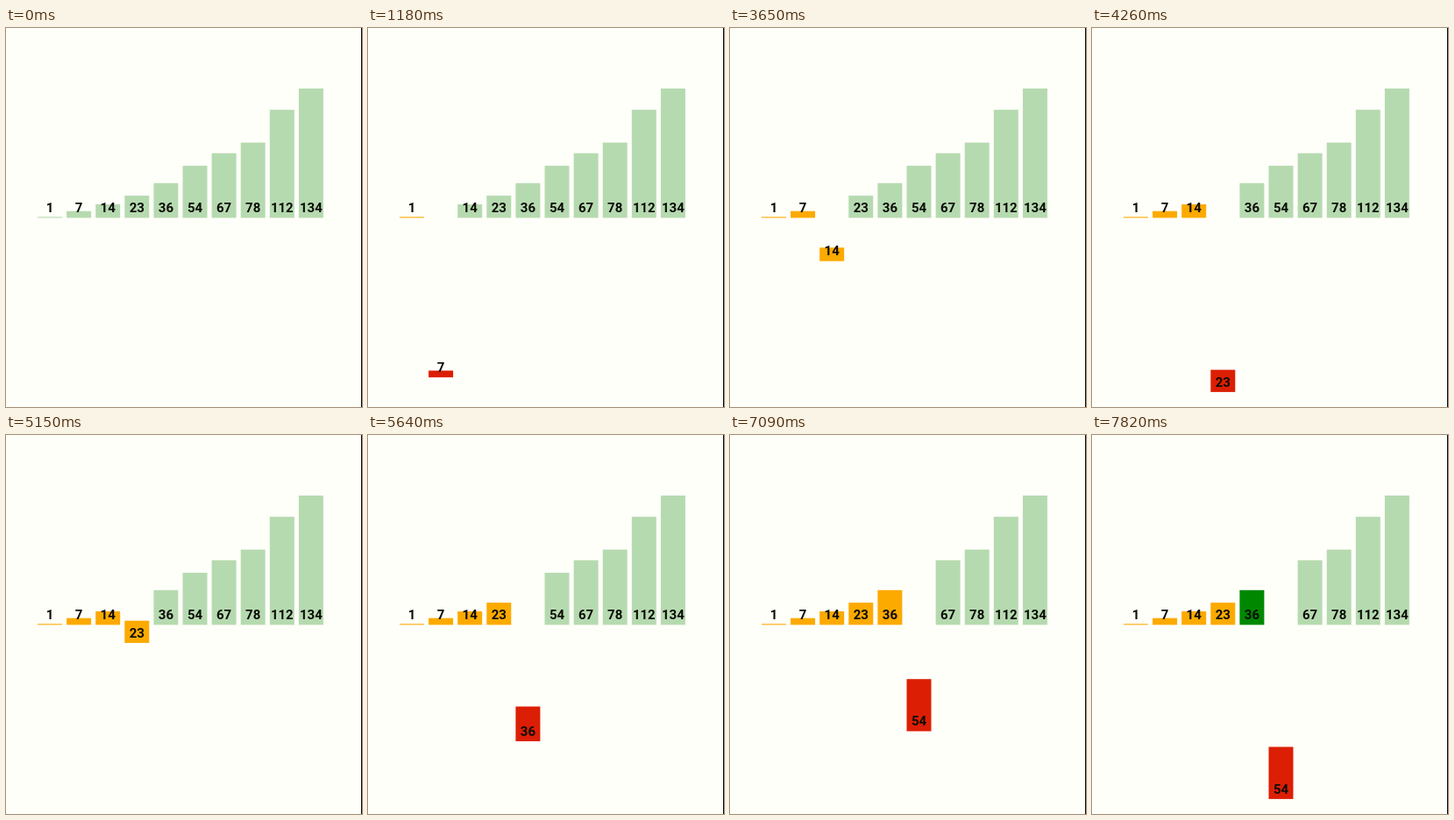
Animation, 406 px wide and 432 px high, one loop 8 s. Source, as an HTML page:

```html
<!DOCTYPE html>
<html lang="en">
<head>
<meta charset="utf-8">
<title>Insertion sort</title>
<style>
  html, body { margin: 0; width: 100%; height: 100%; overflow: hidden; background: #fffffa; }
  svg { display: block; width: 406px; height: 432px; }
  text { font: bold 15px Roboto, Arial, sans-serif; text-anchor: middle; fill: #0c0c08; }
</style>
</head>
<body>
<svg id="stage" viewBox="0 0 406 432">
  <rect x="405" width="1" height="432" fill="#000"/>
</svg>
<script>
  const LOOP = 8000, MOVE = 250, DROP = 198.5;
  const BASE = 216.4, LEFT = 36, PITCH = 33.1, WIDTH = 28, SCALE = 1.1;
  const IDLE = '#b6dab0', SORTED = '#fcaa00', PICKED = '#dc1f04', COMPARED = '#008700';
  const values = [1, 7, 14, 23, 36, 54, 67, 78, 112, 134];
  const FIRST_SORTED = 530;

  // One entry per inserted bar, starting with the second bar
  const passes = [
    { fall: 1000, compare: 1500, rise: 2010 },
    { fall: 2500, compare: 3000, rise: 3500 },
    { fall: 4000, compare: 4500, rise: 4975 },
    { fall: 5500, compare: 6000, rise: 6492 },
    { fall: 6956, compare: 7500, rise: Infinity }
  ];

  const stage = document.getElementById('stage');

  function add(parent, name, attrs) {
    const node = document.createElementNS('http://www.w3.org/2000/svg', name);
    for (const key in attrs) node.setAttribute(key, attrs[key]);
    return parent.appendChild(node);
  }

  const bars = values.map((value, i) => {
    const x = LEFT + PITCH * i, height = value * SCALE;
    const group = add(stage, 'g', {});
    const rect = add(group, 'rect', { x, y: BASE - height, width: WIDTH, height });
    add(group, 'text', { x: x + WIDTH / 2, y: BASE - 6.4 }).textContent = value;
    return { group, rect };
  });

  function ease(p) {
    p = Math.min(1, Math.max(0, p));
    return p < 0.5 ? 4 * p ** 3 : 1 - 4 * (1 - p) ** 3;
  }

  function colorAt(i, t) {
    const own = passes[i - 1], next = passes[i];
    if (next && t >= next.compare && t < next.rise) return COMPARED;
    if (i === 0) return t >= FIRST_SORTED ? SORTED : IDLE;
    if (!own || t < own.fall) return IDLE;
    return t < own.rise ? PICKED : SORTED;
  }

  function offsetAt(i, t) {
    const own = passes[i - 1];
    if (!own) return 0;
    return DROP * (ease((t - own.fall) / MOVE) - ease((t - own.rise) / MOVE));
  }

  function draw(t) {
    bars.forEach(({ group, rect }, i) => {
      group.setAttribute('transform', `translate(0 ${offsetAt(i, t).toFixed(2)})`);
      rect.setAttribute('fill', colorAt(i, t));
    });
  }

  const start = performance.now();
  function tick() {
    draw((performance.now() - start) % LOOP);
    requestAnimationFrame(tick);
  }
  tick();
</script>
</body>
</html>
```
